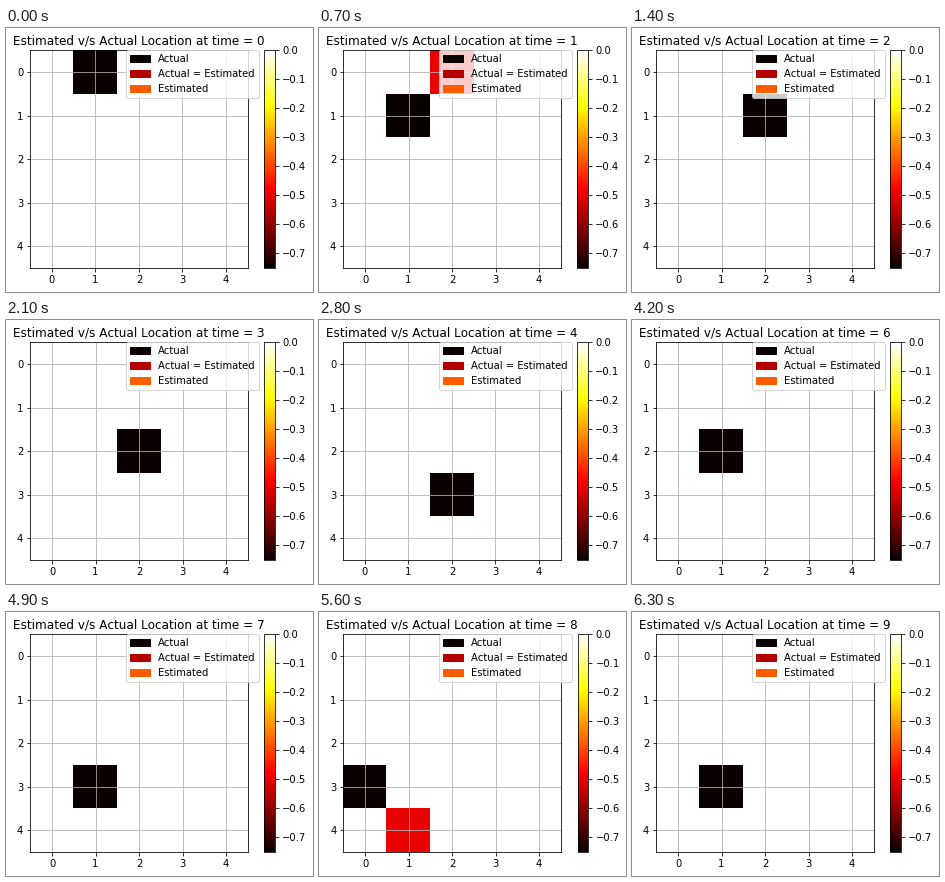
A matplotlib script for the animation above (7000 ms loop, 307x264 px).

```python
import matplotlib.pyplot as plt
import numpy as np
from matplotlib.animation import FuncAnimation
from matplotlib.patches import Patch

# Letters are set without pair kerning.
plt.rcParams["text.kerning_factor"] = 6

W, H, DPI = 307, 264, 72
SIDE, PAD = 217.44, 7.2          # plot side and page margin in pixels
BAR_GAP, BAR_W = 16.74, SIDE / 20
ACTUAL, ESTIMATED = -0.75, -0.5

# (row, column) of the walker at each time step
PATH = [(0, 1), (1, 1), (1, 2), (2, 2), (3, 2),
        (2, 2), (2, 1), (3, 1), (3, 0), (3, 1)]
# time steps where the estimate misses the walker
MISSES = {1: (0, 2), 8: (4, 1)}


def grid_at(t):
    grid = np.zeros((5, 5))
    if t in MISSES:
        grid[MISSES[t]] = ESTIMATED
    grid[PATH[t]] = ACTUAL
    return grid


def place(axes, left, bottom, width):
    axes.set_position([left / W, bottom / H, width / W, SIDE / H])


fig = plt.figure(figsize=(W / DPI, H / DPI), dpi=DPI, facecolor="white")
ax = fig.add_axes([0.08, 0.09, SIDE / W, SIDE / H])
cax = fig.add_axes([0.84, 0.09, BAR_W / W, SIDE / H])

image = ax.imshow(grid_at(0), cmap="hot", vmin=ACTUAL, vmax=0,
                  aspect="auto", interpolation="nearest")
ax.set_xticks(range(5))
ax.set_yticks(range(5))
ax.grid(True)
fig.colorbar(image, cax=cax)

levels = {"Actual": 0.0, "Actual = Estimated": 0.25, "Estimated": 0.5}
ax.legend(handles=[Patch(color=image.cmap(v), label=name)
                   for name, v in levels.items()],
          bbox_to_anchor=(1.05, 1), loc="upper right", borderaxespad=0)
title = ax.set_title("")

# Bottom margin follows the height of the tick labels.
fig.canvas.draw()
label = ax.get_xticklabels()[0].get_window_extent()
BOTTOM = ax.bbox.y0 - label.y0 + PAD


def update(t):
    image.set_data(grid_at(t))
    title.set_text(f"Estimated v/s Actual Location at time = {t}")
    # The title's left edge sits on the page margin.
    left = PAD + (title.get_window_extent().width - SIDE) / 2
    place(ax, left, BOTTOM, SIDE)
    place(cax, left + SIDE + BAR_GAP, BOTTOM, BAR_W)
    return image, title


anim = FuncAnimation(fig, update, frames=len(PATH), interval=700,
                     repeat=True, repeat_delay=0, blit=False)
plt.show()
```
